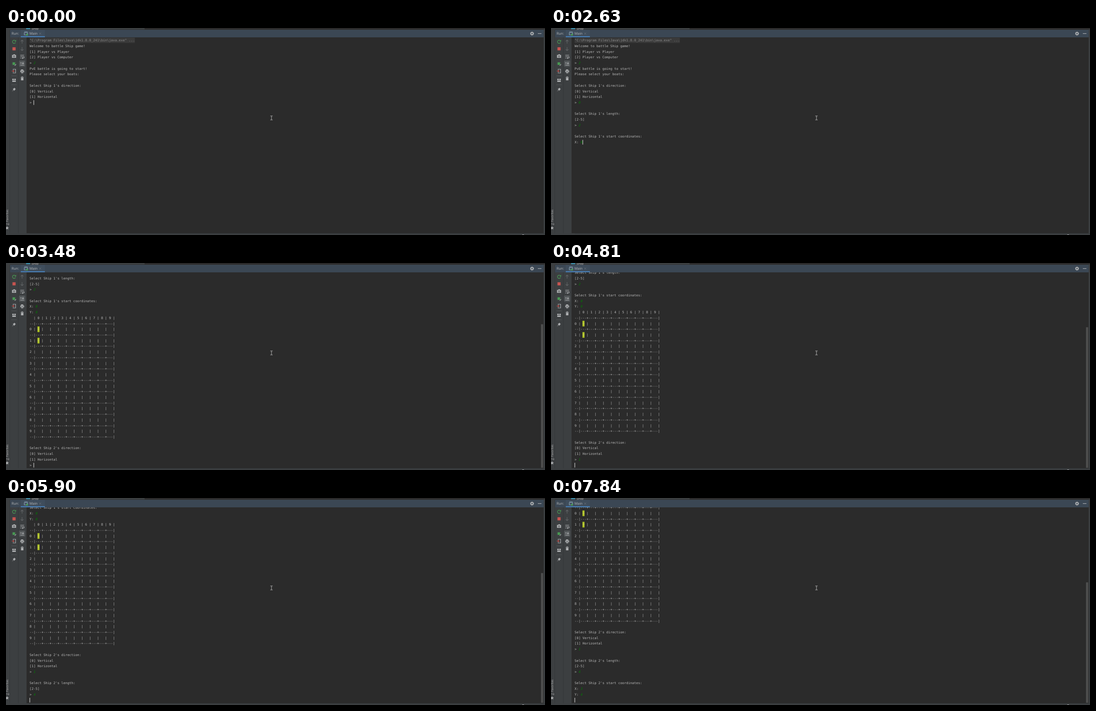
Animation, 1206 px wide and 465 px high, one loop 8000 ms. Source, as an HTML page:

```html
<!DOCTYPE html>
<html lang="en">
<head>
<meta charset="utf-8">
<title>Battle ship console</title>
<style>
html, body { margin: 0; width: 100%; height: 100%; overflow: hidden; background: #2b2b2b; }
svg { display: block; }
text { white-space: pre; text-rendering: geometricPrecision; fill: #bbb; }
.ui { font-family: "Open Sans", "Noto Sans", sans-serif; font-size: 7.8px; }
#console { font-family: "DejaVu Sans Mono", monospace; font-size: 7.38px; }
.typed { fill: #007f00; font-style: italic; }
.ship { fill: #c9d164; }
.line { fill: none; stroke: #afb1b3; stroke-width: 1.2; }
.dim { stroke: #616466; }
.solid { fill: #afb1b3; }
</style>
</head>
<body>
<svg width="1206" height="465" viewBox="0 0 1206 465">
  <defs><clipPath id="view"><rect x="46" y="21" width="1157" height="440"/></clipPath></defs>
  <!-- window panels -->
  <rect width="1206" height="465" fill="#3c3f41"/>
  <rect x="310" width="896" height="3" fill="#2b2b2b"/>
  <rect x="9" y="3" width="1194" height="1" fill="#323232"/>
  <rect x="9" y="4" width="1194" height="17" fill="#3b4754"/>
  <rect x="33" y="4" width="54" height="15" fill="#3f4d5c"/>
  <rect x="33" y="18.6" width="54" height="2" fill="#4a88c7"/>
  <rect x="46" y="21" width="1157" height="440" fill="#2b2b2b"/>
  <path d="M8.5 4V461M27.5 21V461M53 462H1206" fill="none" stroke="#333638"/>
  <rect x="1155" y="464" width="4" height="1" fill="#afb1b3"/>
  <!-- title bar -->
  <svg width="310" height="4" class="ui">
    <rect x="45" width="9" height="3" fill="#3e86a0"/>
    <text x="57" y="4.3">Ship</text>
  </svg>
  <g class="ui">
    <text x="12.5" y="15.3">Run:</text>
    <text x="52.5" y="15.3">Main</text>
    <path d="M74.5 10.5l4 4m0-4l-4 4" stroke="#73797f" stroke-width=".8"/>
    <path d="M41 8.5h7.500M41 10.500h7.500v5h-7.500z" class="line" style="stroke:#8ba4b5"/>
    <circle cx="47" cy="15" r="2.200" fill="#499c54"/>
    <circle cx="1177" cy="12.500" r="2.600" class="line" style="stroke-width:2"/>
    <circle cx="1177" cy="12.500" r="3.900" class="line" style="stroke-width:1;stroke-dasharray:1.600 1.460"/>
    <path d="M1190 12.500h8" class="line"/>
  </g>
  <!-- run toolbar -->
  <path d="M20.500 28.300A3.600 3.600 0 1 0 21.400 32.500" class="line" style="stroke:#499c54"/>
  <path d="M19 30.500h3.500v-4z" fill="#499c54"/>
  <rect x="14.500" y="43.300" width="7" height="7" fill="#c75450"/>
  <path d="M13.500 60.500h2.500l1-1.500h2.500l1 1.500h2v6.500h-9z" class="solid"/>
  <circle cx="18" cy="63.600" r="1.700" fill="none" stroke="#3c3f41"/>
  <path d="M14 77l7 6m-7 0l7-6m-7.500 3h8" stroke="#499c54"/>
  <ellipse cx="17.500" cy="80" rx="2.300" ry="3.300" fill="#499c54"/>
  <path d="M19.500 84.500l3-3" class="line"/>
  <path d="M16 94v-1.500h5.500v8.500h-5.500v-1.500" class="line"/>
  <path d="M13 96.700h5m-2-2l2 2-2 2" class="line" style="stroke:#c75450"/>
  <path d="M12 107.500h12M12 127.500h12" stroke="#515456"/>
  <path d="M14 114h3.500v3H14zm4.500 0H22v3h-3.500zM14 118h8v3h-8z" class="solid"/>
  <path d="M18.500 134l3.500 3.500-1.500.5-1.500 3-4-4 3-1.500zM16.500 139l-3 3.500 3.500-2.500z" class="solid"/>
  <path d="M36 35v-8m-3 3l3-3 3 3M36 43v8m-3-3l3 3 3-3" class="line dim"/>
  <path d="M32 61h8.500M32 64h7a1.700 1.700 0 0 1 0 3.500h-3m1.500-1.500l-1.500 1.500 1.500 1.500M32 67.500h2" class="line"/>
  <rect x="29" y="73" width="14" height="14" rx="2" fill="#505456"/>
  <path d="M32 77.500h3M32 80h3M32 83.500h8.500M38 76v5m-2-2l2 2 2-2" class="line"/>
  <path d="M33.500 93h5v2h-5zM32 95.500h8.500v4h-1.500v-1.500h-5.500v1.500H32zM34 99h4.500v2.500H34z" class="solid"/>
  <path d="M33 110h6.500v1.200H33zM35 109h2.500v1H35zM33.500 112h5.500v5.500h-5.500z" class="solid"/>
  <!-- side stripe -->
  <text class="ui" style="font-size:6.500px" transform="translate(5.300 442.500) rotate(-90)"><tspan text-decoration="underline">2</tspan>: Favorites</text>
  <path d="M2.500 445l1.100 2.700 2.900.2-2.200 1.900.7 2.900-2.500-1.600-2.500 1.600.7-2.900-2.200-1.900 2.900-.2z" class="solid"/>
  <g clip-path="url(#view)"><g id="console"></g></g>
  <rect id="thumb" x="1197" width="5" fill="#4d4d4d"/>
  <path d="M591.500 197.500h2l.5.500.5-.5h2M594 198v8M591.500 206.500h2l.5-.500.5.500h2" fill="none" stroke="#d0d0d0" stroke-width=".9"/>
</svg>
<script>
const LOOP = 8000, LEFT = 52.8, CHAR = 4.443, LINE = 12.72, FIRST = 27.5, LAST = 454, TOP = 21, VIEW = 440;

const direction = n => `\nSelect Ship ${n}'s direction:\n[0] Vertical\n[1] Horizontal\n> `;
const length = n => `\nSelect Ship ${n}'s length:\n[2-5]\n> `;
const start = n => `\nSelect Ship ${n}'s start coordinates:\nX: `;

// "#" is a ship cell, "~" marks the next character as user input
function board() {
  const rule = "--|" + Array(10).fill("---").join("+") + "|\n";
  let out = "  | " + [...Array(10).keys()].join(" | ") + " |\n" + rule;
  for (let y = 0; y < 10; y++)
    out += `${y} |${y < 2 ? " # " : "   "}|` + "   |".repeat(9) + "\n" + rule;
  return out;
}

const intro = `"C:\\Program Files\\Java\\jdk1.8.0_241\\bin\\java.exe" ...
Welcome to battle Ship game!
[1] Player vs Player
[2] Player vs Computer
> ~2
PvE battle is going to start!
Please select your boats:
`;

// [time, appended output]; null hides the caret
const events = [
  [0, intro + direction(1)], [250, null], [650, "~0"], [900, "\n"],
  [1090, length(1)], [1770, null], [2080, "~2"], [2200, "\n"],
  [2390, start(1)], [2630, "~0"], [2750, "\n"],
  [2940, "Y: "], [3060, "~0"], [3170, "\n"],
  [3410, board() + direction(2)], [3480, ""], [4250, null], [4690, "~1"], [4810, "\n"],
  [5000, length(2)], [5470, "~4"], [5900, "\n"],
  [6150, start(2)], [6740, null], [7010, "~3"], [7130, "\n"],
  [7320, "Y: "], [7650, "~4"], [7840, "\n"]
];
const SCROLL_START = 3480;

const consoleGroup = document.getElementById("console");
const thumb = document.getElementById("thumb");
const rect = (x, y, w, h, fill) => `<rect x="${x}" y="${y}" width="${w}" height="${h}" fill="${fill}"/>`;
const escapeText = s => s.replace(/&/g, "&amp;").replace(/</g, "&lt;").replace(/>/g, "&gt;");

function lineMarkup(line, i) {
  const y = FIRST + i * LINE;
  const cell = line.indexOf("#");
  let out = "";
  if (i === 0) out += rect(LEFT, y - 5.7, line.length * CHAR, 11.7, "#3a3a3a");
  if (cell >= 0) out += rect(LEFT + cell * CHAR - 0.2, y - 6.2, CHAR + 0.2, 12.7, "#abc023");
  const spans = escapeText(line)
    .replace(/~(.)/g, '<tspan class="typed">$1</tspan>')
    .replace("#", '<tspan class="ship">0</tspan>');
  const style = i === 0 ? ' style="fill:#8c8c8c"' : "";
  return `${out}<text x="${LEFT}" y="${y + 2.6}"${style}>${spans}</text>`;
}

function render(index) {
  const time = events[index][0];
  const lines = events.slice(0, index + 1).map(e => e[1] || "").join("").split("\n");
  const row = lines.length - 1;
  const column = lines[row].replace("~", "").length;
  const scroll = time < SCROLL_START ? 0 : Math.max(0, FIRST + row * LINE - LAST);
  let markup = lines.map(lineMarkup).join("");
  if (events[index][1] !== null)
    markup += rect(LEFT + column * CHAR - 0.1, FIRST + row * LINE - 5.2, 1.2, 10.6, "#d0d0d0");
  consoleGroup.innerHTML = markup;
  consoleGroup.setAttribute("transform", `translate(0 ${-scroll})`);
  const thumbTop = TOP + VIEW * scroll / (scroll + VIEW);
  thumb.setAttribute("y", thumbTop);
  thumb.setAttribute("height", scroll ? TOP + VIEW - 1 - thumbTop : 0);
}

let shown = -1;
function tick() {
  const time = performance.now() % LOOP;
  const index = events.findLastIndex(e => e[0] <= time);
  if (index !== shown) render(shown = index);
  requestAnimationFrame(tick);
}
tick();
</script>
</body>
</html>
```
